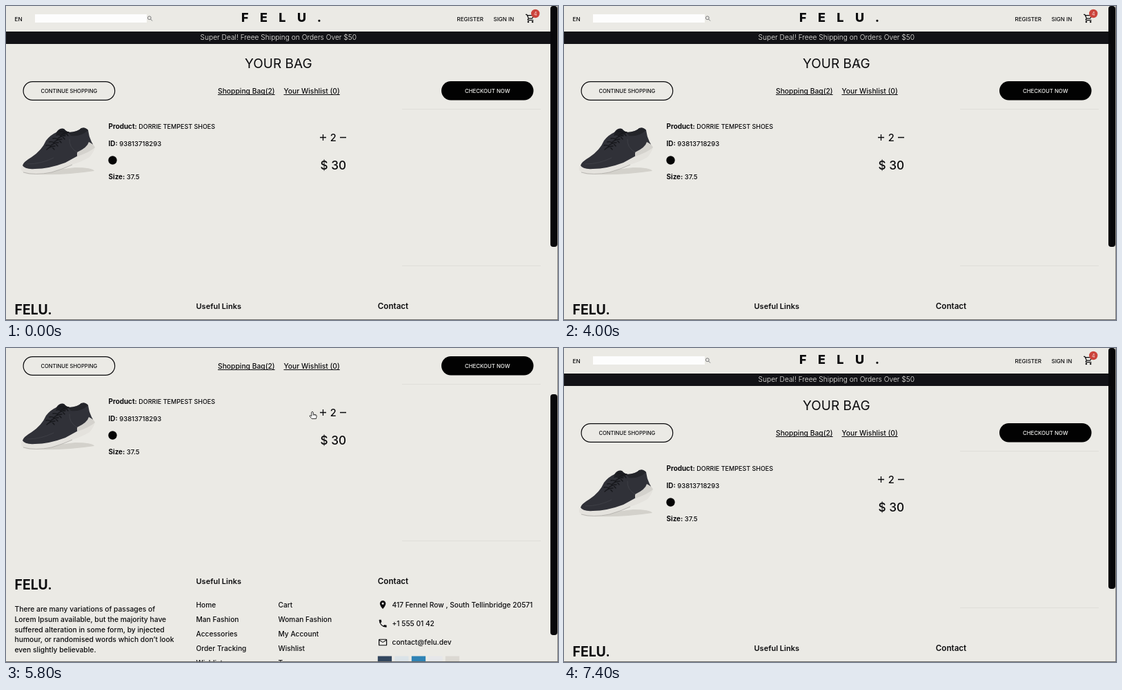
These frames come from a looping animation (800x455 px, 8 s). An HTML page with a canvas:

```html
<!DOCTYPE html>
<html lang="en">
<head>
<meta charset="utf-8">
<title>Shopping bag</title>
<style>
  html, body { margin: 0; width: 100%; height: 100%; overflow: hidden; background: #ebeae5; }
  canvas { display: block; width: 800px; height: 455px; }
</style>
</head>
<body>
<canvas id="stage" width="800" height="455"></canvas>
<script>
const ctx = document.getElementById('stage').getContext('2d');
const LOOP = 8000, STEP = 200;
const INK = '#0b0b0d', PAPER = '#ebeae5';

// [time, value...] keys; linear in between
const SCROLL = [[5000, 0], [5200, 8], [5400, 33], [5600, 65], [5800, 97],
  [6000, 134], [6200, 80], [6400, 8], [6600, 0]];
const THUMB = [[5000, 0], [5200, 4], [5400, 24], [5600, 46], [5800, 67],
  [6000, 98], [6200, 66], [6400, 14], [6600, 0]];
const POINTER = [[1400, 774, 446], [1800, 540, 190], [2200, 426, 83], [4000, 426, 83],
  [5000, 443, 94], [5400, 443, 94], [5600, 444, 92], [6600, 444, 92], [7400, 780, 470]];

function at(keys, t) {
  if (t <= keys[0][0]) return keys[0].slice(1);
  for (let i = 1; i < keys.length; i++) {
    const a = keys[i - 1], b = keys[i];
    if (t <= b[0]) {
      const k = (t - a[0]) / (b[0] - a[0]);
      return a.slice(1).map((v, n) => v + (b[n + 1] - v) * k);
    }
  }
  return keys[keys.length - 1].slice(1);
}

function text(str, x, y, size, { weight = 500, color = INK, align = 'left', spacing = 0 } = {}) {
  ctx.font = `${weight} ${size}px Inter, sans-serif`;
  ctx.letterSpacing = spacing + 'px';
  ctx.textAlign = align;
  ctx.fillStyle = color;
  ctx.fillText(str, x, y);
  return ctx.measureText(str).width;
}

function box(x, y, w, h, color) {
  ctx.fillStyle = color;
  ctx.fillRect(x, y, w, h);
}

function disc(x, y, r, color) {
  ctx.fillStyle = color;
  ctx.beginPath();
  ctx.arc(x, y, r, 0, Math.PI * 2);
  ctx.fill();
}

function pill(x, y, w, h, r) {
  ctx.beginPath();
  ctx.roundRect(x, y, w, h, r);
}

function shape(d, color) {
  ctx.fillStyle = color;
  ctx.fill(new Path2D(d));
}

function line(d, color, width) {
  ctx.strokeStyle = color;
  ctx.lineWidth = width;
  ctx.stroke(new Path2D(d));
}

function icon(d, x, y, size) {
  ctx.save();
  ctx.translate(x, y);
  ctx.scale(size / 24, size / 24);
  shape(d, INK);
  ctx.restore();
}

const CART = 'M15.5 13c.8 0 1.4-.4 1.8-1l3.6-6.5c.4-.7-.1-1.5-.9-1.5H5.2l-.9-2H1v2h2l3.6 7.6-1.3 2.4C4.5 15.4 5.5 17 7 17h12v-2H7l1.1-2zM6.2 6h12.1l-2.8 5h-7zM7 18a2 2 0 1 0 0 4 2 2 0 0 0 0-4zm10 0a2 2 0 1 0 0 4 2 2 0 0 0 0-4z';
const PIN = 'M12 2a7 7 0 0 0-7 7c0 5.2 7 13 7 13s7-7.8 7-13a7 7 0 0 0-7-7zm0 9.5a2.5 2.5 0 1 1 0-5 2.5 2.5 0 0 1 0 5z';
const PHONE = 'M6.6 10.8a15 15 0 0 0 6.6 6.6l2.2-2.2a1 1 0 0 1 1-.2 11 11 0 0 0 3.6.5 1 1 0 0 1 1 1V20a1 1 0 0 1-1 1A17 17 0 0 1 3 4a1 1 0 0 1 1-1h3.5a1 1 0 0 1 1 1 11 11 0 0 0 .6 3.6 1 1 0 0 1-.3 1z';
const MAIL = 'M22 6a2 2 0 0 0-2-2H4a2 2 0 0 0-2 2v12a2 2 0 0 0 2 2h16a2 2 0 0 0 2-2zm-2 0l-8 5-8-5zm0 12H4V8l8 5 8-5z';

function header() {
  text('EN', 12.5, 21.5, 8.2);
  box(42, 12, 162, 12, '#fdfdfd');
  line('M210.2 17.2a2.4 2.4 0 1 0-4.8 0a2.4 2.4 0 1 0 4.8 0M209.5 19l2.5 2.6', '#77787a', 1);
  text('FELU.', 341, 23, 18, { weight: 800, spacing: 16.4 });
  text('REGISTER', 653.5, 22, 8);
  text('SIGN IN', 706.5, 22, 8);
  icon(CART, 752.5, 10.5, 15);
  disc(767.2, 11, 6.2, '#cb433b');
  text('4', 767.2, 13.6, 7, { weight: 400, color: '#f6dcd9', align: 'center' });
  box(0, 37, 789, 18, '#121216');
  text('Super Deal! Freee Shipping on Orders Over $50', 394.8, 49, 10.2,
    { weight: 300, color: '#efeeea', align: 'center' });
}

function underlined(str, x) {
  const w = text(str, x, 126.5, 10.3);
  box(x, 128, w, 1, INK);
}

function toolbar() {
  text('YOUR BAG', 394.8, 89.5, 19, { weight: 400, align: 'center' });
  ctx.strokeStyle = INK;
  ctx.lineWidth = 1.2;
  pill(25.1, 109.6, 132.6, 26.8, 13.4);
  ctx.stroke();
  text('CONTINUE SHOPPING', 91.3, 126, 7.6, { align: 'center' });
  underlined('Shopping Bag(2)', 307);
  underlined('Your Wishlist (0)', 402.5);
  ctx.fillStyle = '#020202';
  pill(631, 109, 133.5, 27.5, 13.7);
  ctx.fill();
  text('CHECKOUT NOW', 697.8, 126, 7.8, { color: '#f3f3f0', align: 'center' });
}

function shoe() {
  shape('M27 243Q75 247 128 239Q125 234 100 234Z', '#d3d1cb');
  shape('M23 232Q20 238 25 241Q42 247 66 241Q83 236 96 230Q111 225 121 219Q127 212 129 205L116 200L74 222Z', '#e4e2dd');
  line('M25 241Q42 246 66 241Q83 236 96 230', '#b4b2ad', 0.9);
  shape('M24 231Q25 226 37 219Q52 209 58 195Q64 187 73 183Q78 176 84 178Q87 182 92 183Q104 182 109 177Q115 175 119 180Q120 189 124 197Q127 201 126 205Q106 216 86 227Q62 236 42 236Q27 237 24 231Z', '#303138');
  shape('M72 185Q78 176 84 178Q87 182 92 183L84 188Z', '#1d1e23');
  shape('M90 183Q104 183 109 177Q115 175 119 180Q108 190 94 188Z', '#24252a');
  shape('M103 212Q118 205 120 197Q127 200 129 205Q121 212 103 218Z', '#d4d2cd');
  // laces
  ctx.lineCap = 'round';
  for (let i = 0; i < 5; i++) {
    const x = 58 + i * 5, y = 207 - i * 5;
    line(`M${x} ${y - 5}q6 -2 12 6M${x + 1} ${y + 1}q5 -5 12 -5`, '#17181c', 1.4);
  }
  line('M31 229Q51 229 69 220M92 193Q91 205 103 212', '#42434a', 0.8);
  ctx.lineCap = 'butt';
}

function detail(label, value, y, valueSize) {
  const w = text(label, 148.5, y, 9.9, { weight: 700 });
  text(value, 148.5 + w + 2.5, y, valueSize);
}

function product() {
  shoe();
  detail('Product:', 'DORRIE TEMPEST SHOES', 177.5, 9);
  detail('ID:', '93813718293', 202.7, 9.5);
  disc(154.5, 223.5, 6.2, '#050505');
  detail('Size:', '37.5', 250.7, 9.6);
  line('M455 190.5h9M459.5 186v9M484 190.5h9', INK, 1.3);
  text('2', 474.3, 195.6, 14.6, { align: 'center' });
  text('$ 30', 474.3, 237, 17.2, { align: 'center' });
  line('M574 149.5h201M574 376.5h201', '#dfded9', 1);
}

const ABOUT = ['There are many variations of passages of', 'Lorem Ipsum available, but the majority have',
  'suffered alteration in some form, by injected', 'humour, or randomised words which don’t look',
  'even slightly believable.'];
const LINKS = [['Home', 'Cart'], ['Man Fashion', 'Woman Fashion'], ['Accessories', 'My Account'],
  ['Order Tracking', 'Wishlist'], ['Wishlist', 'Terms']];
const CONTACT = [[PIN, '417 Fennel Row , South Tellinbridge 20571'], [PHONE, '+1 555 01 42'],
  [MAIL, 'contact@felu.dev']];
const CARDS = ['#33475f', '#dbe3e8', '#2f83b5', '#e6e7ea', '#dcd9d3'];

function footer() {
  text('FELU.', 12.5, 447, 19.4, { weight: 700 });
  text('Useful Links', 275.5, 438.5, 11, { weight: 600 });
  text('Contact', 538.8, 438.5, 11.6, { weight: 600 });
  ABOUT.forEach((s, i) => text(s, 12.5, 479 + i * 14.8, 10.3));
  LINKS.forEach(([a, b], i) => {
    const y = 472.5 + i * 21.1;
    text(a, 275.5, y, 10.2);
    text(b, 394.5, y, 10.2);
  });
  CONTACT.forEach(([d, s], i) => {
    const y = 469 + i * 27.2;
    icon(d, 538.8, y - 7.2, 14.6);
    text(s, 559.5, y + 3.5, 10.2);
  });
  CARDS.forEach((c, i) => box(538.8 + i * 24.5, 543.5, 20.3, 13, c));
}

function pointer(t) {
  if (t < 1600 || t >= 7400) return;
  const [x, y] = at(POINTER, t);
  ctx.save();
  ctx.translate(x, y);
  ctx.lineJoin = 'round';
  if (t >= 2200 && t < 4200) {
    line('M-2.5 -5Q0 -5 0 -3Q0 -5 2.5 -5M0 -3V4M-2.5 5.5Q0 5.5 0 3.5Q0 5.5 2.5 5.5', '#333', 1);
  } else if (t >= 5600 && t < 6800) {
    const hand = 'M-1.2 1Q0 -1 1.2 1V4L5 4.8Q6.5 5.2 6.2 7L5.4 10.5H-0.8L-3.8 7Q-4.2 5.4 -2.6 5.8L-1.2 7Z';
    shape(hand, '#fff');
    line(hand, '#222', 0.9);
    line('M1.2 4V6M3 4.6V6.2M4.7 5V6.4', '#222', 0.6);
  } else {
    const arrow = 'M0 0V10.5L2.5 8.2L4.2 12L6 11.2L4.3 7.6H7.6Z';
    shape(arrow, '#fff');
    line(arrow, '#222', 0.9);
  }
  ctx.restore();
}

function draw(t) {
  box(0, 0, 800, 455, PAPER);
  ctx.save();
  ctx.translate(0, -at(SCROLL, t)[0]);
  header();
  toolbar();
  product();
  footer();
  ctx.restore();
  ctx.fillStyle = '#08080a';
  pill(789, at(THUMB, t)[0], 10, 349, 4);
  ctx.fill();
  box(799, 0, 1, 455, '#8d8a86');
  box(0, 454, 800, 1, '#6b6a68');
  pointer(t);
}

function tick(now) {
  draw(Math.floor((now % LOOP) / STEP) * STEP);
  requestAnimationFrame(tick);
}
requestAnimationFrame(tick);
</script>
</body>
</html>
```
